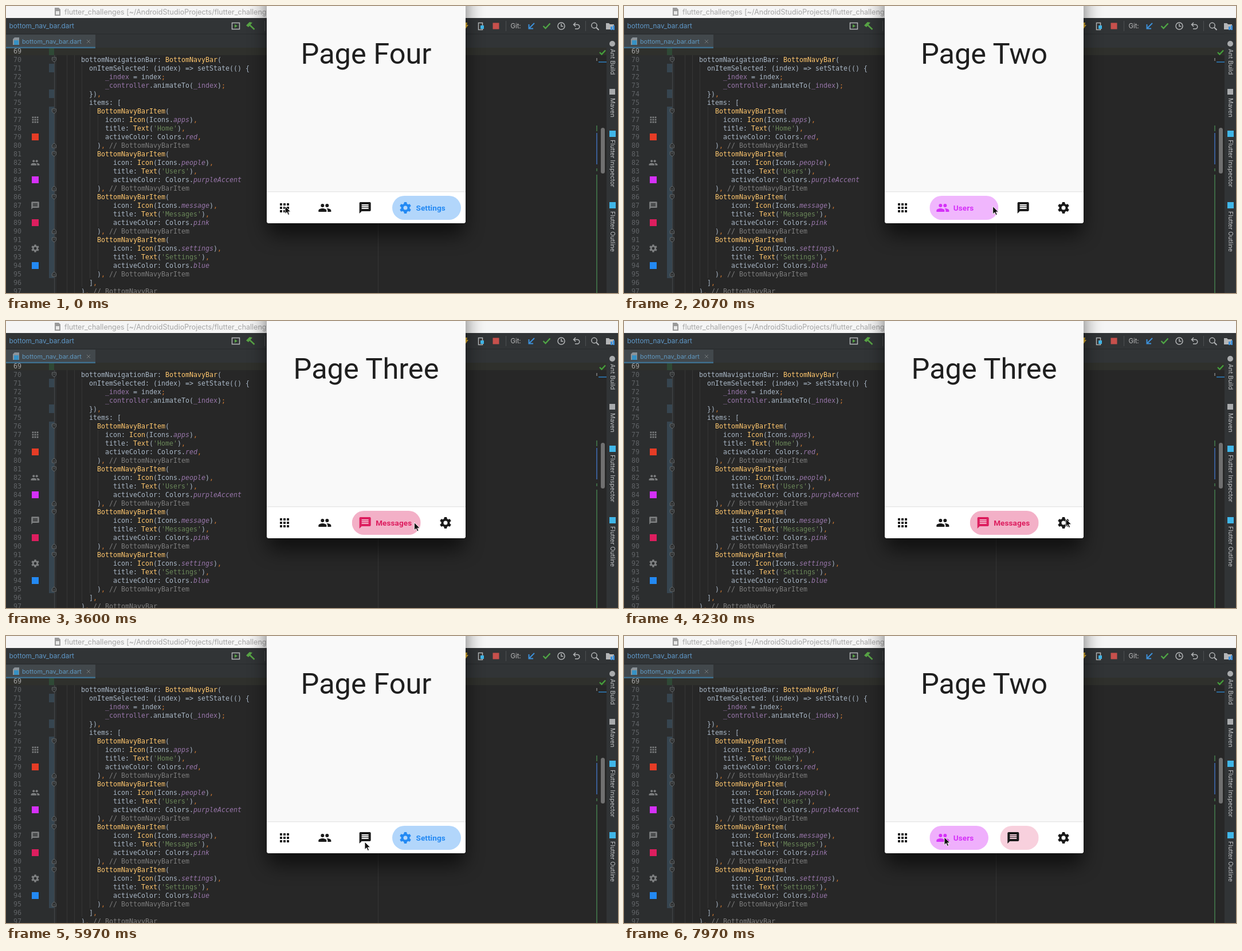
Animation, 1068 px wide and 502 px high, one loop 8 s. Source, as an HTML page:

```html
<!DOCTYPE html>
<html lang="en">
<head>
<meta charset="utf-8">
<title>Bottom navigation bar</title>
<style>
html, body { margin: 0; width: 100%; height: 100%; overflow: hidden; background: #272727; }
svg { display: block; }
text { white-space: pre; font-family: Inter, "Open Sans", sans-serif; }
.code text { font: 11.63px "DejaVu Sans Mono", monospace; fill: #a9b7c6; }
.code .num { fill: #606366; }
.call { fill: #ffc66d; } .str { fill: #6a8759; } .punct { fill: #cc7832; }
.note { fill: #7d7d7d; } .field { fill: #9876aa; } .const { fill: #9876aa; font-style: italic; }
.page { font: 50.5px Roboto, sans-serif; fill: #1f1f1f; text-anchor: middle; }
.label { font: bold 13.5px Roboto, sans-serif; letter-spacing: .1px; }
.line { fill: none; stroke-width: 1.5; }
</style>
</head>
<body>
<svg id="stage" width="1068" height="502" viewBox="0 0 1068 502"></svg>
<script>
const stage = document.getElementById('stage');
const rect = (x, y, w, h, fill, more = '') =>
  `<rect x="${x}" y="${y}" width="${w}" height="${h}" fill="${fill}" ${more}/>`;
const text = (x, y, size, fill, s) => `<text x="${x}" y="${y}" font-size="${size}" fill="${fill}">${s}</text>`;
const line = (d, color, more = '') => `<path class="line" d="${d}" stroke="${color}" ${more}/>`;
const shape = (d, fill) => `<path d="${d}" fill="${fill}"/>`;

// Icons on a 24 px grid
const cells = [4, 10, 16];
const gearTeeth = [0, 60, 120, 180, 240, 300]
  .map(a => `<path transform="rotate(${a})" d="M-3-6L-2.1-10H2.1L3-6z"/>`).join('');
const icons = {
  apps: `<path d="${cells.map(x => cells.map(y => `M${x} ${y}h4v4h-4z`).join('')).join('')}"/>`,
  people: '<circle cx="8" cy="8" r="3"/><circle cx="16" cy="8" r="3"/>' +
    '<path d="M8 13c-2.33 0-7 1.17-7 3.5V19h14v-2.5c0-2.33-4.67-3.5-7-3.5z"/>' +
    '<path d="M16 13c-.29 0-.62.02-.97.05 1.16.84 1.97 1.97 1.97 3.45V19h6v-2.5c0-2.33-4.67-3.5-7-3.5z"/>',
  message: '<path d="M20 2H4c-1.1 0-2 .9-2 2v18l4-4h14c1.1 0 2-.9 2-2V4c0-1.1-.9-2-2-2z' +
    'm-2 12H6v-2h12v2zm0-3H6V9h12v2zm0-3H6V6h12v2z"/>',
  settings: `<g transform="translate(12 12)"><circle r="5.5" fill="none" stroke="currentColor" stroke-width="4"/>${gearTeeth}</g>`
};
const icon = (name, cx, cy, scale, color) =>
  `<g class="icon" fill="currentColor" color="${color}" transform="translate(${cx} ${cy}) scale(${scale}) translate(-12 -12)">${icons[name]}</g>`;

const items = [
  { icon: 'apps', title: 'Home', shade: 'red,', rgb: [229, 60, 38], page: 'Page One' },
  { icon: 'people', title: 'Users', shade: 'purpleAccent', rgb: [213, 48, 248], page: 'Page Two' },
  { icon: 'message', title: 'Messages', shade: 'pink', rgb: [221, 30, 95], page: 'Page Three' },
  { icon: 'settings', title: 'Settings', shade: 'blue', rgb: [35, 137, 243], page: 'Page Four' }
];
const css = c => `rgb(${c})`;

// Code lines as [indent, text], from line 69 on
const code = [
  [0, ''],
  [0, 'bottomNavigationBar: BottomNavyBar('],
  [2, 'onItemSelected: (index) => setState(() {'],
  [6, '_index = index;'],
  [6, '_controller.animateTo(_index);'],
  [2, '}),'],
  [2, 'items: ['],
  ...items.flatMap((it, i) => {
    const n = i ? 8 : 6;
    return [
      [4, 'BottomNavyBarItem('],
      [n, `icon: Icon(Icons.${it.icon}),`],
      [n, `title: Text('${it.title}'),`],
      [n, `activeColor: Colors.${it.shade}`],
      [4, '), // BottomNavyBarItem']
    ];
  }),
  [2, '],'],
  [0, '), // BottomNavyBar']
];
const kinds = ['note', 'str', 'call', 'const', 'field', 'punct'];
const token = /(\/\/.*)|('[^']*')|((?:BottomNavyBar(?:Item)?|Icon|Text)(?=\())|((?<=(?:Icons|Colors)\.)\w+)|(_\w+)|([,;])/g;
const paint = s => s.replace(token, (m, ...groups) =>
  `<tspan class="${kinds[groups.slice(0, 6).findIndex(Boolean)]}">${m}</tspan>`);
const rowY = n => 78.5 + (n - 69) * 15;

function editor() {
  let s = rect(0, 73, 88, 429, '#2c2e2f') + rect(0, 73, 1048, 13, '#2f302c');
  s += rect(75, 73, 9, 13, '#2f4936') + [[101, 15], [146, 15], [176, 300]]
    .map(([y, h]) => rect(75, y, 9, h, '#364550')).join('');
  s += line('M84.5 86V502', '#44474a', 'style="stroke-width:1"');
  s += line('M106.5 86V502M119.5 86V502M132.5 101V491M146.5 176V476M160.5 191V236M160.5 266V311M160.5 341V386M160.5 416V461M649.5 73V502',
    '#363636', 'style="stroke-width:1"');
  for (const n of [70, 76, 81, 86, 91])
    s += `<path d="M80.5 ${rowY(n) - 3.5}h7v5l-3.5 3-3.5-3zm2 3h3" fill="#2c2e2f" stroke="#65686a"/>`;
  for (const n of [80, 85, 90, 95])
    s += `<path d="M80.5 ${rowY(n) + 4.5}h7v-5l-3.5-3-3.5 3zm2-3h3" fill="#2c2e2f" stroke="#65686a"/>`;
  items.forEach((it, i) => {
    s += icon(it.icon, 51, rowY(77 + 5 * i) + .5, .68, '#7d7f80');
    s += rect(45, rowY(79 + 5 * i) - 5.5, 12, 12, css(it.rgb));
  });
  s += '<g class="code">' + code.map(([indent, t], i) => {
    const y = rowY(69 + i) + 4.5;
    return `<text class="num" x="13" y="${y}"${i ? '' : ' style="fill:#a4a3a3"'}>${69 + i}</text>` +
      `<text x="${131 + indent * 7}" y="${y}">${paint(t)}</text>`;
  }).join('') + '</g>';
  // Marker strip and scrollbar
  s += rect(1038, 213, 7, 80, '#707070', 'rx="3.5"') + rect(1034, 97, 14, 2, '#2b6a9c') + rect(1030, 91, 2, 5, '#6c6c6c');
  s += [[209, 10, '#3d6844'], [222, 55, '#3a5c94'], [284, 5, '#3d6844'], [295, 207, '#3d6844']]
    .map(([y, h, c]) => rect(1030, y, 2, h, c)).join('');
  return s + line('M1036 81l3.5 3.5 6.5-7', '#45a13c', 'style="stroke-width:2.3"');
}

function chrome() {
  const grey = '#b4b6b8', blue = '#3d8fd8';
  let s = rect(0, 0, 1068, 21, '#f5f5f5') + rect(0, 21, 1068, 52, '#313436') + rect(0, 48.5, 1068, 1, '#292b2c');
  s += shape('M85 3h7l3 3v11H85z', '#9a9a9a') + rect(87, 9, 6, 6, '#e8e8e8');
  s += text(102, 14.5, 12.5, '#a5a5a5', 'flutter_challenges [~/AndroidStudioProjects/flutter_challenges]');
  s += text(5.5, 39, 11.8, '#5f98c8', 'bottom_nav_bar.dart');
  // Tab
  s += rect(0, 50, 156, 23, '#42484c') + rect(0, 71.5, 156, 2.5, '#3f6f8d');
  s += shape('M15 55h8v13H12V58z', '#8b9399') + rect(14, 60, 8, 8, '#3791c4');
  s += text(28, 66, 10.8, '#5f98c0', 'bottom_nav_bar.dart') + line('M141 59l6 6m0-6l-6 6', '#73787b', 'style="stroke-width:1"');
  // Toolbar
  s += line('M394.5 29.5h13v11h-13z', grey) + shape('M399 32l5 3-5 3z', '#58a445');
  s += line('M424 32l9.5 9', '#58a445', 'style="stroke-width:2.5"') + shape('M419 34l6-6 5 1-7 8z', '#58a445');
  s += rect(451, 26, 1, 18, '#4b4e50') + shape('M801 29h4l-1 4h3l-6 8z', '#e3b22e');
  s += line('M824.5 29.5h7v12h-7z', grey) + rect(828, 34, 6, 6, '#40b6e8');
  s += rect(849.5, 29.5, 11, 11, '#c7504c') + rect(872, 26, 1, 18, '#4b4e50') + rect(1011, 26, 1, 18, '#4b4e50');
  s += text(880.5, 39, 11.3, '#bcbcbc', 'Git:');
  s += line('M922 30l-9 9m-.5-7v7.500h7.500', blue, 'style="stroke-width:2"');
  s += line('M937.500 35l4 4 8-8.500', '#4fa645', 'style="stroke-width:2.300"');
  s += `<circle class="line" cx="969" cy="35" r="6" stroke="${grey}"/>` + line('M969 31v4.500h3.500', grey);
  s += line('M994 29l-3.500 3.500 3.500 3.500M991 32.500h6a3.700 3.700 0 0 1 0 7.500h-4', grey);
  s += `<circle class="line" cx="1026.500" cy="34" r="4.700" stroke="${grey}"/>` + line('M1030 37.500l4.500 4.500', grey, 'style="stroke-width:2"');
  s += shape('M1047 30h5l2 2h7v9h-14z', grey) + rect(1055, 36, 3, 6, blue) + rect(1059, 34, 3, 8, blue);
  // Side panel
  s += rect(1048, 49, 20, 453, '#313436');
  s += '<circle cx="1058" cy="66" r="5" fill="#a9abad"/>' + rect(1053, 145, 10, 10, '#a9abad');
  s += rect(1053, 218, 11, 11, '#40b6e8') + rect(1053, 343, 11, 11, '#40b6e8');
  for (const [y, t] of [[75, 'Ant Build'], [161, 'Maven'], [234, 'Flutter Inspector'], [359, 'Flutter Outline']])
    s += `<g transform="translate(1054.500 ${y}) rotate(90)">${text(0, 0, 10.7, '#c0c2c4', t)}</g>`;
  return s;
}

function phone() {
  let s = rect(457, -30, 343, 430, '#000', 'rx="8" opacity=".62" filter="url(#blur)"');
  s += shape('M455 0h347v376a4 4 0 0 1-4 4H459a4 4 0 0 1-4-4z', '#f9f9f9');
  s += shape('M455 325.500h347v50.500a4 4 0 0 1-4 4H459a4 4 0 0 1-4-4z', '#fff') + rect(455, 324, 347, 1.5, '#e9e9e9');
  s += '<svg x="455" y="0" width="347" height="324"><text class="page" y="101"/><text class="page" y="101"/></svg>';
  for (const it of items)
    s += `<svg class="item" y="332" height="42"><rect width="100%" height="42" rx="21"/>${icon(it.icon, 23, 21, 1, '#1a1a1a')}` +
      `<text class="label" x="41.500" y="25.700" fill="${css(it.rgb)}">${it.title}</text></svg>`;
  return s;
}

stage.innerHTML = '<defs><filter id="blur" x="-30%" y="-30%" width="160%" height="160%"><feGaussianBlur stdDeviation="17"/></filter></defs>' +
  rect(0, 0, 1068, 502, '#272727') + editor() + chrome() + phone() +
  '<path id="pointer" d="M0 0v13.500l3.200-2.900 2.100 4.900 2.300-1-2.100-4.700h4.300z" fill="#111" stroke="#fff" stroke-width=".9"/>';

const pages = stage.querySelectorAll('.page');
const tabs = [...stage.querySelectorAll('.item')];
const pointer = document.getElementById('pointer');

const LOOP = 8000, GROW = 270, SLIDE = 200;
const taps = [[-999, 3], [230, 0], [1400, 1], [3050, 2], [4500, 3], [6200, 2], [7768, 1]]; // time, tab
const path = [ // time, x, y
  [0, 487, 350], [330, 487, 350], [930, 635, 340], [1200, 560, 352], [1600, 558, 352],
  [2770, 672, 351], [2980, 696, 354], [3350, 698, 354], [4230, 771, 346], [4750, 771, 348],
  [5970, 626, 360], [6400, 626, 358], [7100, 564, 353], [7650, 559, 352], [8000, 559, 352]
];
// Users stays where it is at 628 while Home is open
path[3] = [1200, 628, 350];
path[4] = [1600, 628, 350];

const clamp = v => Math.min(1, Math.max(0, v));
const smooth = v => v * v * (3 - 2 * v);

function drawBar(from, to, p) {
  const open = items.map((_, i) => i === to ? p : i === from ? 1 - p : 0);
  let x = 463;
  tabs.forEach((tab, i) => {
    const k = open[i], width = 50 + 70 * k, active = i === to;
    const rgb = items[i].rgb.map(c => Math.round(c * k + 255 * (1 - k)));
    tab.setAttribute('x', x);
    tab.setAttribute('width', width);
    tab.querySelector('rect').setAttribute('fill', `rgba(${rgb},${1 - .65 * k})`);
    tab.querySelector('.icon').setAttribute('color', active ? css(items[i].rgb) : '#1a1a1a');
    tab.querySelector('.label').style.display = active ? '' : 'none';
    x += width + 61 / 3;
  });
}

function drawPages(from, to, p) {
  const shift = Math.sign(to - from) * 347 * (1 - p) ** 3;
  pages[0].textContent = items[to].page;
  pages[0].setAttribute('x', 173.5 + shift);
  pages[1].textContent = p < 1 ? items[from].page : '';
  pages[1].setAttribute('x', 173.5 + shift - Math.sign(to - from) * 347);
}

function frame() {
  const t = performance.now() % LOOP;
  const n = taps.findLastIndex(tap => tap[0] <= t);
  const [start, to] = taps[n], from = n ? taps[n - 1][1] : 2;
  drawBar(from, to, clamp((t - start) / GROW));
  drawPages(from, to, clamp((t - start) / SLIDE));
  const i = path.findIndex(k => k[0] > t);
  const [t0, x0, y0] = path[i - 1], [t1, x1, y1] = path[i];
  const k = smooth((t - t0) / (t1 - t0));
  pointer.setAttribute('transform', `translate(${x0 + (x1 - x0) * k} ${y0 + (y1 - y0) * k})`);
  requestAnimationFrame(frame);
}
frame();
</script>
</body>
</html>
```
